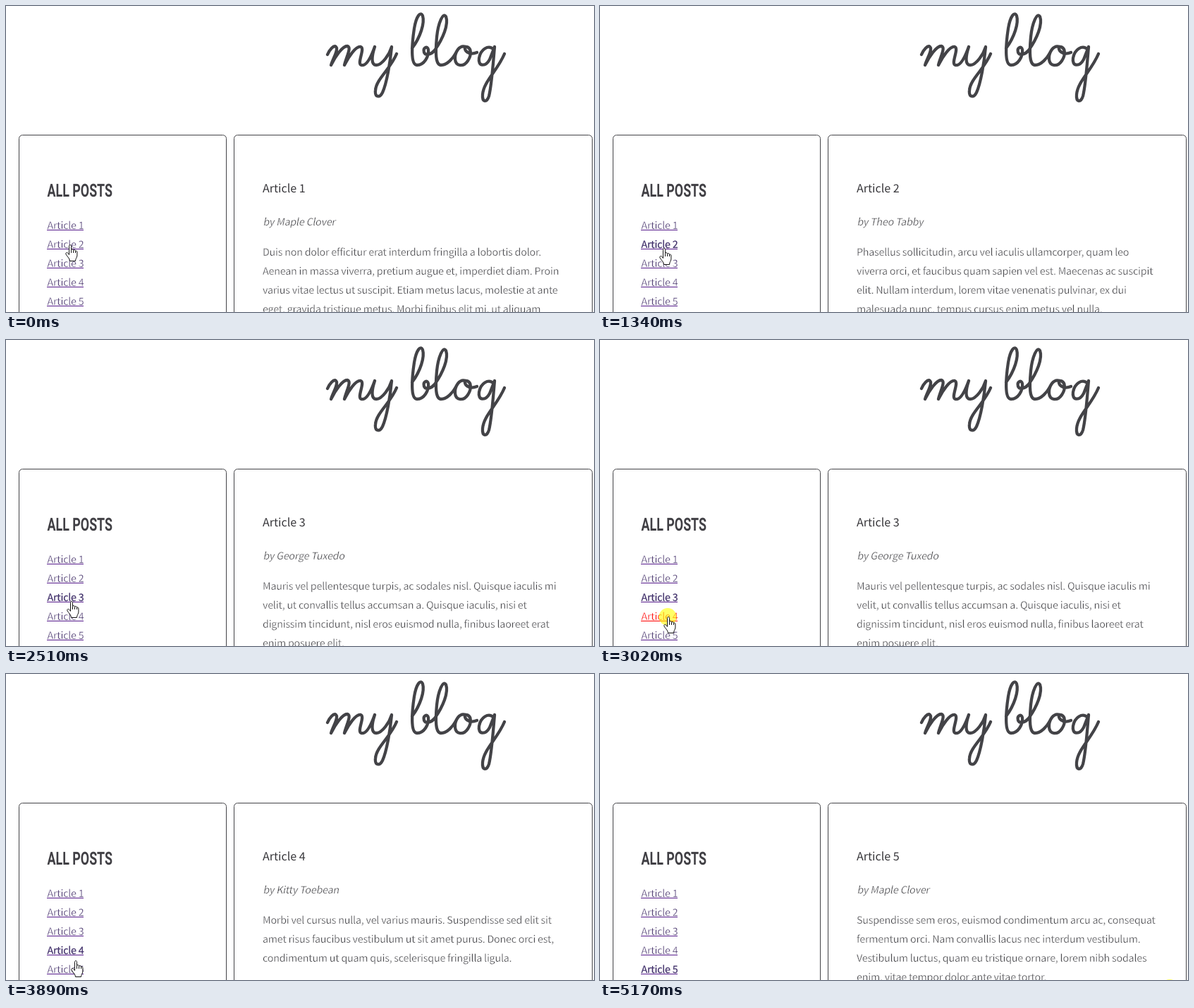
These frames come from a looping animation (834 by 435 pixels, 5.23 s). An HTML page:

```html
<!DOCTYPE html>
<html lang="en">
<head>
<meta charset="utf-8">
<title>my blog</title>
<style>
  html, body { margin: 0; width: 100%; height: 100%; overflow: hidden; background: #fff; }
  svg { display: block; }
  text { white-space: pre; text-rendering: geometricPrecision; }
  .copy text, .links text {
    font: 300 14.3px "Noto Sans CJK JP", "Noto Sans CJK SC", "Noto Sans CJK", "Noto Sans", sans-serif;
    stroke: #fff; stroke-width: .35px; /* a white edge thins the strokes to a light weight */
  }
  .copy { fill: #434347; }
  .copy .title { font-size: 16.1px; font-weight: 400; fill: #38373b; stroke: none; }
  .links g { fill: #46336b; }
  .links rect { fill: #551a8b; }
  .links .current { fill: #40306a; }
  .links .current text { stroke: #40306a; stroke-width: .2px; }
  .links .pressed, .links .pressed rect { fill: #f00; }
  .heading { font: 700 25.5px Roboto, "Liberation Sans", sans-serif; fill: #414045; }
  .panel { fill: none; stroke: #434347; }
  .script { fill: none; stroke: #434347; stroke-width: 4.3; stroke-linecap: round; stroke-linejoin: round; }
  .hand { fill: #fff; stroke: #111; stroke-linejoin: round; }
</style>
</head>
<body>
<svg width="834" height="435" viewBox="0 0 834 435">
  <g class="script" role="img" aria-label="my blog">
    <path d="M456 69C459 62 465 55 468 58C472 62 464 74 461 84C467 72 477 57 484 57C491 58 482 74 480 84C486 72 496 57 503 58C510 60 497 82 504 84C511 86 518 72 523 58C519 70 517 84 525 84C534 84 544 68 547 58C545 80 540 110 534 123C530 131 523 130 524 120C525 104 545 90 554 68"/>
    <path d="M576 60C588 44 594 24 591 14C588 7 582 14 579 32C576 52 573 84 583 84C593 84 600 72 599 62C598 56 591 59 593 66C595 71 603 69 608 63C620 46 628 26 624 15C620 8 613 24 611 44C609 66 609 84 617 84C626 84 634 74 638 67"/>
    <path d="M652 58C643 55 636 66 637 76C638 86 649 87 655 78C661 69 660 58 652 58C648 62 656 71 668 66"/>
    <path d="M692 62C684 54 673 62 671 74C669 86 680 87 686 76L693 58C691 80 689 112 685 128C682 138 675 137 676 126C677 108 697 92 707 68"/>
  </g>
  <rect class="panel" x="18.5" y="183.5" width="294" height="300" rx="5"/>
  <rect class="panel" x="323.5" y="183.5" width="508" height="300" rx="5"/>
  <text class="heading" transform="translate(58.5 271) scale(.7 1)">ALL POSTS</text>
  <g class="links" id="links"></g>
  <g class="copy" id="copy"></g>
  <circle id="halo" r="12.5" fill="#ff0" fill-opacity=".6"/>
  <g class="hand" id="hand">
    <path d="M5.5 14.5V2.5C5.5 0 8.5 0 8.5 2.5V7.5C9 6 11.5 6.5 11.5 8.5C12 7 14.5 7.5 14.5 9.5C15 8.5 16.9 9 16.9 11V16C16.5 19 14.5 20 14.5 23.5H6.5C6.5 20 3.5 18 1 14C0 12 2.5 10.5 4 12.5Z"/>
    <path d="M8.5 7.5V12M11.5 8.5V12M14.5 9.5V12" fill="none"/>
  </g>
</svg>
<script>
const LOOP = 5230;

const articles = [
  ["Maple Clover",
    "Duis non dolor efficitur erat interdum fringilla a lobortis dolor.",
    "Aenean in massa viverra, pretium augue et, imperdiet diam. Proin",
    "varius vitae lectus ut suscipit. Etiam metus lacus, molestie at ante",
    "eget, gravida tristique metus. Morbi finibus elit mi, ut aliquam"],
  ["Theo Tabby",
    "Phasellus sollicitudin, arcu vel iaculis ullamcorper, quam leo",
    "viverra orci, et faucibus quam sapien vel est. Maecenas ac suscipit",
    "elit. Nullam interdum, lorem vitae venenatis pulvinar, ex dui",
    "malesuada nunc, tempus cursus enim metus vel nulla."],
  ["George Tuxedo",
    "Mauris vel pellentesque turpis, ac sodales nisl. Quisque iaculis mi",
    "velit, ut convallis tellus accumsan a. Quisque iaculis, nisi et",
    "dignissim tincidunt, nisl eros euismod nulla, finibus laoreet erat",
    "enim posuere elit."],
  ["Kitty Toebean",
    "Morbi vel cursus nulla, vel varius mauris. Suspendisse sed elit sit",
    "amet risus faucibus vestibulum ut sit amet purus. Donec orci est,",
    "condimentum ut quam quis, scelerisque fringilla ligula."],
  ["Maple Clover",
    "Suspendisse sem eros, euismod condimentum arcu ac, consequat",
    "fermentum orci. Nam convallis lacus nec interdum vestibulum.",
    "Vestibulum luctus, quam eu tristique ornare, lorem nibh sodales",
    "enim, vitae tempor dolor ante vitae tortor."]
];

// Each click: link pressed, article swapped, halo gone.
const clicks = [
  { post: 1, down: 420, swap: 490, up: 560 },
  { post: 2, down: 1820, swap: 1870, up: 1950 },
  { post: 3, down: 3020, swap: 3110, up: 3190 },
  { post: 4, down: 4620, swap: 4680, up: 4680 }
];

// Pointer moves run in even, visible steps.
const moves = [
  { from: 1270, to: 1570, steps: 5, x: 85, y: 366 },
  { from: 2510, to: 2880, steps: 6, x: 90, y: 393 },
  { from: 3420, to: 3420, steps: 1, x: 91, y: 393 },
  { from: 3740, to: 4040, steps: 5, x: 92, y: 416 },
  { from: 4210, to: 4210, steps: 1, x: 92, y: 418 },
  { from: 4280, to: 4280, steps: 1, x: 92, y: 416 },
  { from: 4910, to: 4910, steps: 1, x: 92, y: 415 }
];
const LEAVE = 5080, NEXT_HALO = 5170;

const byId = id => document.getElementById(id);
const links = byId("links"), copy = byId("copy"), halo = byId("halo"), hand = byId("hand");

const line = (x, y, words, extra = "") => `<text x="${x}" y="${y}" ${extra}>${words}</text>`;

links.innerHTML = articles.map((_, i) => {
  const y = 317 + 27 * i;
  return `<g>${line(58.5, y, "Article " + (i + 1))}<rect x="58" y="${y + 1}" width="52" height="1"/></g>`;
}).join("");

copy.innerHTML = articles.map(([author, ...body], i) => `<g>
  ${line(364, 265, "Article " + (i + 1), 'class="title"')}
  ${line(0, 0, "by " + author, 'class="by" transform="translate(364.5 312) skewX(-11)"')}
  ${body.map((words, n) => line(364, 355 + 27 * n, words, 'class="body"')).join("")}</g>`).join("");

// One shared tracking value keeps the texture even if the light weight is missing.
const sample = copy.querySelector(".body");
const tracking = (395 - sample.getComputedTextLength()) / sample.textContent.length;
for (const text of document.querySelectorAll(".body, .by, .links text"))
  text.style.letterSpacing = tracking + "px";

function pointerAt(t) {
  let x = 84, y = 339;
  for (const m of moves) {
    if (t < m.from) break;
    const gap = (m.to - m.from) / (m.steps - 1 || 1);
    const step = gap ? Math.min(m.steps, 1 + Math.floor((t - m.from) / gap + 1e-6)) : 1;
    const p = step / m.steps;
    x += (m.x - x) * p;
    y += (m.y - y) * p;
  }
  return [Math.round(x), Math.round(y)];
}

const show = (el, on) => el.setAttribute("visibility", on ? "visible" : "hidden");

function draw(now) {
  const t = now % LOOP;
  const loaded = clicks.filter(c => t >= c.swap).pop();
  const active = clicks.find(c => t >= c.down && t < c.up);
  const post = loaded ? loaded.post : 0;

  [...copy.children].forEach((el, i) => show(el, i === post));
  [...links.children].forEach((el, i) => {
    const pressed = active && t < active.swap && active.post === i;
    el.setAttribute("class", pressed ? "pressed" : loaded && i === post ? "current" : "");
  });

  const [x, y] = pointerAt(t);
  hand.setAttribute("transform", `translate(${x} ${y})`);
  show(hand, t < LEAVE);

  const leaving = t >= NEXT_HALO;
  halo.setAttribute("transform", leaving ? "translate(808 446.5)" : `translate(${x + 6} ${y + .5})`);
  show(halo, active || leaving);
  requestAnimationFrame(draw);
}
draw(0);
</script>
</body>
</html>
```
